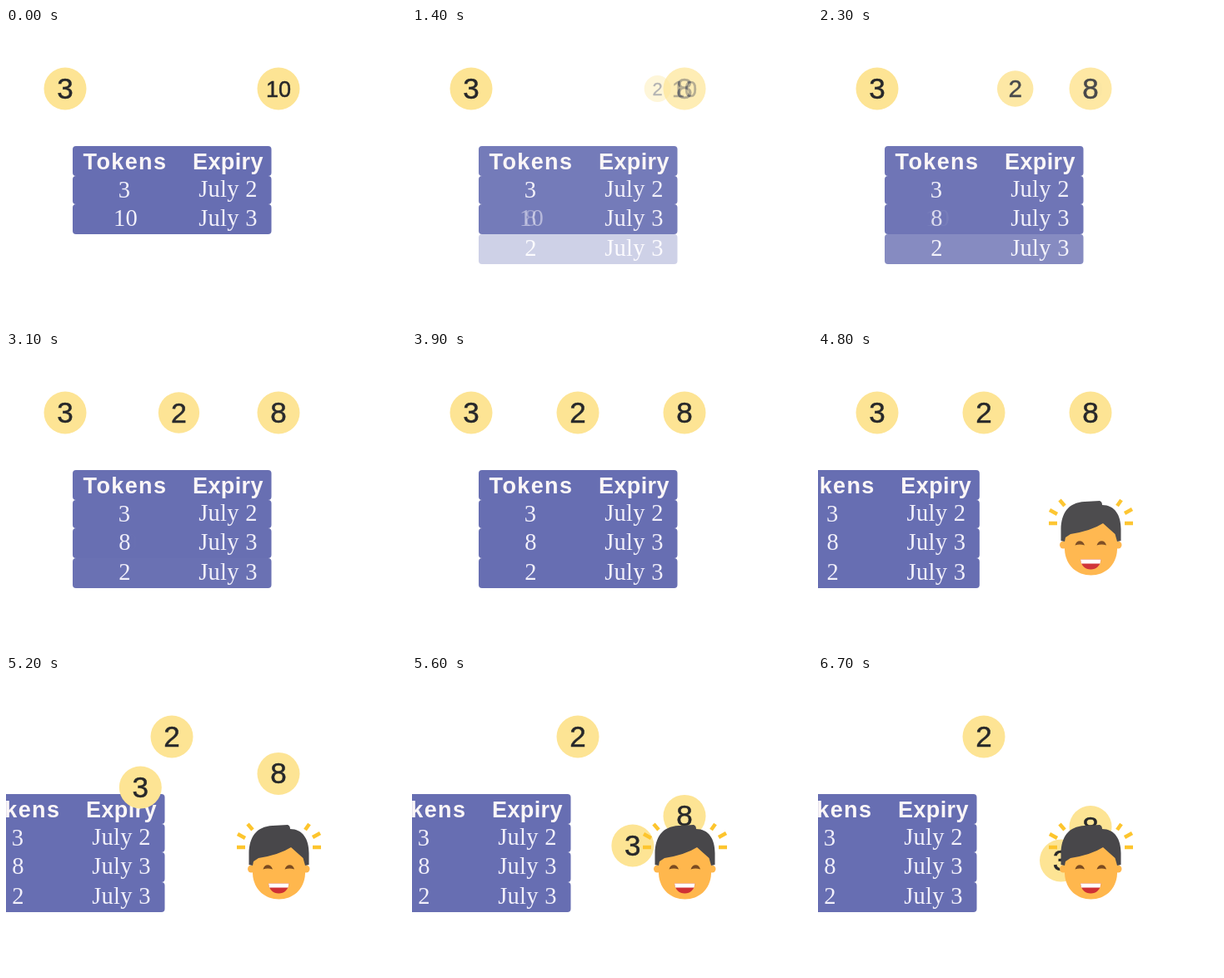
An HTML page that plays this animation: 480x356 px, repeating every 8 s.

```html
<!DOCTYPE html>
<html lang="en">
<head>
<meta charset="utf-8">
<title>Token expiry</title>
<style>
  html, body { margin: 0; width: 100%; height: 100%; overflow: hidden; background: #fff; }
  svg { display: block; width: 100vw; height: 100vh; }
  text { text-anchor: middle; }
  .soft { filter: blur(.6px); }
  .coin circle { fill: #fde494; }
  .coin text { font: 35px "Liberation Sans", Arial, sans-serif; fill: #27282a; stroke: #27282a; stroke-width: .5; }
  .coin .small { font-size: 27px; }
  .table rect { fill: #676eb2; }
  .table text { font: 28.5px "Liberation Serif", "Times New Roman", serif; fill: #f2f0fa; letter-spacing: .3px; }
  .table .head { font: bold 27px "Liberation Sans", Arial, sans-serif; fill: #fbf6f7; text-anchor: start; }
  .rays { fill: none; stroke: #fdc52e; stroke-width: 4.5; }
</style>
</head>
<body>
<svg viewBox="0 0 480 356">
  <g class="soft">
    <g id="table" class="table">
      <rect x="80" y="142" width="238.5" height="36" rx="4"/>
      <rect x="80" y="178" width="238.5" height="34" rx="4"/>
      <rect x="80" y="212" width="238.5" height="36" rx="4"/>
      <text class="head" x="92.5" y="170" style="letter-spacing:1.4px">Tokens</text>
      <text class="head" x="224" y="170" style="letter-spacing:.4px">Expiry</text>
      <text x="142" y="204">3</text>
      <text x="266.5" y="203">July 2</text>
      <text id="oldCell" x="143.500" y="238">10</text>
      <text id="newCell" x="142.500" y="238">8</text>
      <text x="266.5" y="238">July 3</text>
      <g id="row">
        <rect x="80" y="248" width="238.5" height="36" rx="4"/>
        <text x="142.500" y="273.500">2</text>
        <text x="266.5" y="273.500">July 3</text>
      </g>
    </g>

    <g id="two" class="coin"><circle r="25.5"/><text y="12">2</text></g>
    <g id="ten" class="coin"><circle r="25.5"/><text class="small" y="9.500">10</text></g>
    <g id="eight" class="coin"><circle r="25.5"/><text y="12">8</text></g>
    <g id="three" class="coin"><circle r="25.5"/><text y="12">3</text></g>

    <g id="face">
      <path class="rays" d="M290 178l6 7M278 190l9 5M277 206h10M364 178l-5 7M377 189l-9 5M378 206h-10"/>
      <g fill="#ffb74d">
        <circle cx="294.500" cy="232" r="4.500"/>
        <circle cx="360" cy="232" r="4.500"/>
        <path d="M296 212V238C297 257 311 268.500 327.500 268.500S358 257 359 238V212L345 200H310Z"/>
      </g>
      <path fill="#48474a" d="M291.500 227V213C292 194 300 181 320 180L338 179Q341 180 341 184C356 184 363.500 196 363.500 213V227L359 228L356.500 219L342 206Q328 215 303 219L297 223L296 228Z"/>
      <path fill="#7b4b20" d="M308.500 232.500C310 225.500 318 225.500 320 232.500Q314 230.500 308.500 232.500ZM334.500 232.500C336.500 225.500 344.500 225.500 346 232.500Q340.500 230.500 334.500 232.500Z"/>
      <path fill="#cf3034" d="M315 249.500H339.500C339 257 334 261.500 327.300 261.500S315.500 257 315 249.500Z"/>
      <path fill="#fff" d="M315 249.500H339.500L338.500 254.500H316Z"/>
    </g>
  </g>
</svg>
<script>
const LOOP = 8000, STEP = 100, TOP = 73;
const $ = id => document.getElementById(id);
const lerp = (a, b, p) => a + (b - a) * p;
const easeOut = (ms, start, length, power) =>
  1 - (1 - Math.min(1, Math.max(0, (ms - start) / length))) ** power;

function put(id, x, y, scale = 1) {
  $(id).setAttribute('transform', `translate(${x} ${y}) scale(${scale})`);
}
function fade(opacity, ...ids) {
  for (const id of ids) $(id).setAttribute('opacity', opacity);
}

function draw(ms) {
  // The ten splits into eight and two
  const split = easeOut(ms, 1020, 2800, 2);
  const blend = easeOut(ms, 1020, 2800, 3);
  put('two', lerp(327, 199, split), TOP, lerp(.5, 1, split));
  put('ten', 327, TOP);
  fade(blend, 'two', 'eight', 'newCell', 'row');
  fade((1 - blend) ** 1.5, 'ten', 'oldCell');

  // The table makes room for the face
  const shift = easeOut(ms, 3980, 1050, 2.4);
  put('table', lerp(0, -128, shift), 0);
  fade(1 - .4 * blend * (1 - blend), 'table');
  fade(shift, 'face');

  // Three and eight are handed over
  const give = easeOut(ms, 4997, 1030, 2.4);
  put('three', lerp(71, 291.5, give), lerp(TOP, 222, give));
  put('eight', 327, lerp(TOP, 181.5, give));
}

function tick(now) {
  draw(Math.floor(now % LOOP / STEP) * STEP);
  requestAnimationFrame(tick);
}
draw(0);
requestAnimationFrame(tick);
</script>
</body>
</html>
```
